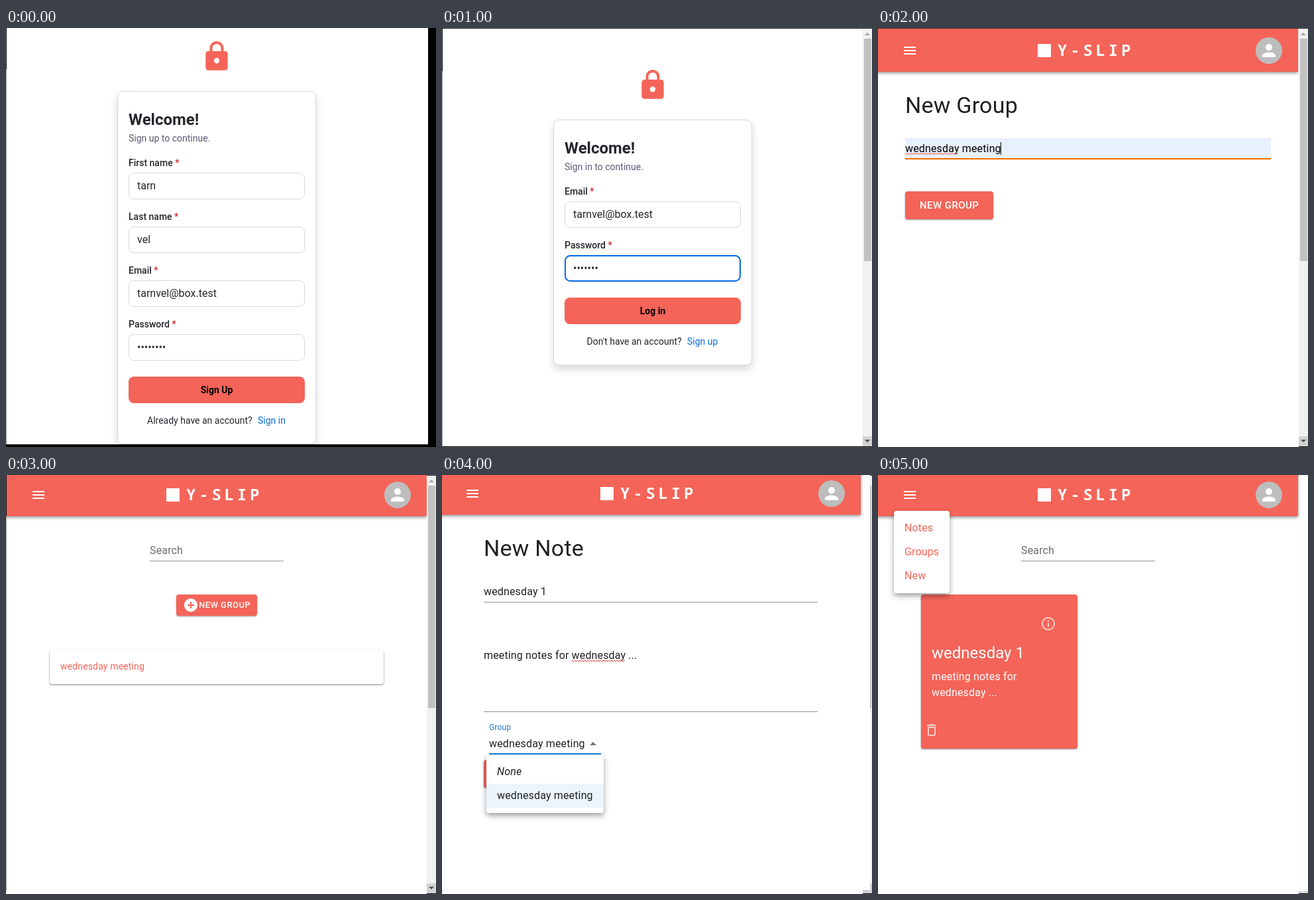
Recreate the animation shown at these times as an HTML page. Size 649 by 631 pixels, loop 6 s.

```html
<!DOCTYPE html>
<html lang="en">
<head>
<meta charset="utf-8">
<title>Notes app tour</title>
<style>
  html, body { margin: 0; width: 100%; height: 100%; overflow: hidden; background: #fff; }
  svg { display: block; font-family: Roboto, sans-serif; white-space: pre; }
  .brand { font: 700 24px "Noto Sans Mono", monospace; letter-spacing: 4.8px; }
  .app { letter-spacing: .15px; }
  .bar { filter: drop-shadow(0 2px 2.5px rgba(0,0,0,.42)); }
  .sheet { filter: drop-shadow(0 4px 4px rgba(0,0,0,.38)); }
  .raised { filter: drop-shadow(0 1.5px 1.2px rgba(0,0,0,.42)); }
  .flat { filter: drop-shadow(0 1px .9px rgba(0,0,0,.5)); }
  .form { filter: drop-shadow(0 6px 6px rgba(60,60,70,.2)); }
</style>
</head>
<body>
<svg id="stage" width="649" height="631" viewBox="0 0 649 631"></svg>
<script>
const CORAL = '#f46458', INK = '#25252d', DARK = '#212121', BLUE = '#096bde', GREY = '#949494';

const ICONS = {
  lock: 'M18 8h-1V6c0-2.76-2.24-5-5-5S7 3.24 7 6v2H6c-1.1 0-2 .9-2 2v10c0 1.1.9 2 2 2h12c1.1 0 2-.9 2-2V10c0-1.1-.9-2-2-2zm-6 9c-1.1 0-2-.9-2-2s.9-2 2-2 2 .9 2 2-.9 2-2 2zm3.1-9H8.9V6c0-1.71 1.39-3.1 3.1-3.1s3.1 1.39 3.1 3.1z',
  menu: 'M3 18h18v-2H3zm0-5h18v-2H3zm0-7v2h18V6z',
  person: 'M12 12c2.21 0 4-1.79 4-4s-1.79-4-4-4-4 1.79-4 4 1.79 4 4 4zm0 2c-2.67 0-8 1.34-8 4v2h16v-2c0-2.66-5.33-4-8-4z',
  add: 'M12 2C6.48 2 2 6.48 2 12s4.48 10 10 10 10-4.48 10-10S17.52 2 12 2zm5 11h-4v4h-2v-4H7v-2h4V7h2v4h4z',
  info: 'M11 7h2v2h-2zm0 4h2v6h-2zm1-9C6.48 2 2 6.48 2 12s4.48 10 10 10 10-4.48 10-10S17.52 2 12 2zm0 18c-4.41 0-8-3.59-8-8s3.59-8 8-8 8 3.59 8 8-3.59 8-8 8z',
  bin: 'M6 19c0 1.1.9 2 2 2h8c1.1 0 2-.9 2-2V7H6zM8 9h8v10H8zm7.5-5l-1-1h-5l-1 1H5v2h14V4z'
};

const rect = (x, y, w, h, fill, attrs = '') =>
  `<rect x="${x}" y="${y}" width="${w}" height="${h}" fill="${fill}" ${attrs}/>`;
const text = (x, y, size, fill, str, attrs = '') =>
  `<text x="${x}" y="${y}" font-size="${size}" fill="${fill}" ${attrs}>${str}</text>`;
const icon = (name, x, y, size, fill, attrs = '') =>
  `<path d="${ICONS[name]}" fill="${fill}" fill-rule="evenodd" transform="translate(${x} ${y}) scale(${size / 24})" ${attrs}/>`;
const appText = (x, y, str, fill = DARK, size = 16, attrs = '') =>
  text(x, y, size, fill, str, 'class="app" ' + attrs);
const heading = (x, y, str) => text(x, y, 34, DARK, str, 'letter-spacing=".25"');
const squiggle = (x, y, width) =>
  `<path d="M${x} ${y}${'l2 2l2-2'.repeat(width / 4)}" fill="none" stroke="#e8413c"/>`;

function field(top, value, focused) {
  const inset = focused ? 1 : .5;
  return rect(185 + inset, top + inset, 266 - 2 * inset, 40 - 2 * inset, '#fff',
      `rx="7.5" stroke="${focused ? BLUE : '#d8d8df'}" stroke-width="${2 * inset}"`) +
    text(198, top + 25, 16, INK, value);
}

function signForm({ top, subtitle, fields, button, question, questionX, link, linkX }) {
  const buttonTop = top + 106 + fields.length * 81;
  const rows = fields.map(([label, value, focused], i) => {
    const y = top + 123 + i * 81;
    return text(185, y - 10, 14, INK, `${label} <tspan fill="#d3232f">*</tspan>`, 'font-weight="500"') +
      field(y, value, focused);
  });
  return icon('lock', 293, top - 77, 50, CORAL) +
    rect(168.5, top + .5, 299, buttonTop + 101 - top, '#fff', 'rx="7.5" stroke="#d8d8df" class="form"') +
    text(185, top + 51, 24, INK, 'Welcome!', 'font-weight="700"') +
    text(185, top + 76, 14, '#5a5a72', subtitle) +
    rows.join('') +
    rect(185, buttonTop, 266, 40, CORAL, 'rx="8"') +
    text(318, buttonTop + 25, 14, '#000', button, 'font-weight="700" text-anchor="middle"') +
    text(questionX, buttonTop + 71, 14, INK, question) +
    text(linkX, buttonTop + 71, 14, BLUE, link);
}

const leftEdge = split => rect(0, 0, 1, split, '#111') + rect(0, split, 1, 627 - split, '#a4a4a4');

const scrollbar =
  rect(635, 0, 14, 631, '#f1f1f1') +
  rect(637, 16, 11, 335, '#c1c1c1') +
  rect(635, 615, 14, 15, '#d2d2d2') +
  rect(635, 0, 14, 1, '#222') + rect(635, 630, 14, 1, '#000') +
  '<path d="M638 11h8l-4-4z" fill="#a3a3a3"/><path d="M638 620h8l-4 4z" fill="#505050"/>';

// Positions are relative to a 66px tall bar, moved as a whole.
const header = (dx, dy) =>
  `<g transform="translate(${dx} ${dy})">` +
  rect(-5, -5, 639, 71, CORAL, 'class="bar"') +
  icon('menu', 36, 22, 24, '#fff') +
  rect(241, 24, 20, 20, '#fff') +
  '<text x="271" y="42" class="brand" fill="#fff">Y-SLIP</text>' +
  '<circle cx="590" cy="34" r="20" fill="#bdbdbd"/>' +
  icon('person', 575, 19, 30, '#fff') + '</g>';

const searchBox = x =>
  appText(x, 119, 'Search', '#6b6b6b') + rect(x, 129, 202, 1, GREY);

const signUp = signForm({
  top: 95, subtitle: 'Sign up to continue.', button: 'Sign Up',
  fields: [['First name', 'tarn'], ['Last name', 'vel'],
    ['Email', 'tarnvel@box.test'], ['Password', '•'.repeat(8)]],
  question: 'Already have an account?', questionX: 213, link: 'Sign in', linkX: 380
}) + leftEdge(62) + rect(637, 0, 12, 631, '#000') + rect(0, 627, 649, 4, '#000');

const logIn = signForm({
  top: 138, subtitle: 'Sign in to continue.', button: 'Log in',
  fields: [['Email', 'tarnvel@box.test'], ['Password', '•'.repeat(7), true]],
  question: "Don't have an account?", questionX: 218.5, link: 'Sign up', linkX: 370
}) + leftEdge(65) + rect(0, 627, 1, 3, '#a4a4a4') +
  rect(0, 0, 635, 1, '#222') + rect(0, 630, 635, 1, '#000') + scrollbar;

const newGroup = header(0, 0) + rect(0, 0, 635, 1, '#333') +
  heading(41, 128, 'New Group') +
  rect(41, 166, 552, 30, '#e8f0fe') + rect(41, 196, 552, 2, '#ef6c00') +
  appText(41, 187, 'wednesday meeting', '#000') + squiggle(41, 188.5, 81) +
  rect(185, 172, 1, 19, '#000') +
  rect(41, 246, 133, 42, CORAL, 'rx="4" class="raised"') +
  text(63, 272, 15, '#fff', 'NEW GROUP', 'font-weight="500" letter-spacing=".43"') + scrollbar;

const groupList = header(1, -4) + leftEdge(62) + searchBox(217) +
  rect(257, 180, 122, 32, CORAL, 'rx="4" class="raised"') +
  icon('add', 267, 184, 24, '#fff') +
  text(291, 200, 13, '#fff', 'NEW GROUP', 'font-weight="500" letter-spacing=".46"') +
  rect(66, 263, 504, 52, '#fff', 'rx="4" class="flat"') +
  appText(82, 293, 'wednesday meeting', CORAL, 14) + scrollbar;

const newNote = scrollbar + rect(0, 0, 646, 625, '#fff') + rect(0, 625, 1, 2, '#a4a4a4') +
  header(-2, -6) +
  heading(63, 122, 'New Note') +
  appText(63, 181, 'wednesday 1') + rect(63, 191, 504, 1, GREY) +
  appText(63, 277, 'meeting notes for wednesday ...') + squiggle(196, 279, 81) +
  rect(63, 356, 504, 1, GREY) +
  appText(71, 384, 'Group', '#1976d2', 12) +
  appText(71, 410, 'wednesday meeting') +
  '<path d="M223 407h10l-5-5z" fill="#757575"/>' +
  rect(63, 429, 100, 42, CORAL, 'rx="4" class="raised"') +
  rect(67, 421, 177, 88, '#fff', 'rx="4" class="sheet"') +
  rect(71, 419, 169, 2, '#1976d2') +
  rect(67, 465, 177, 36, '#ecf4fc') +
  appText(83, 452, 'None', DARK, 16, 'font-style="italic"') +
  appText(83, 488, 'wednesday meeting');

const noteList = scrollbar + rect(0, 0, 649, 627, '#fff') + header(0, -4) + searchBox(216) +
  rect(65, 180, 236, 232, CORAL, 'rx="4" class="flat"') +
  icon('info', 245, 212, 24, '#fff', 'opacity=".65"') +
  text(81, 276, 24, '#fff', 'wednesday 1') +
  appText(81, 309, 'meeting notes for', '#fff') +
  appText(81, 333, 'wednesday ...', '#fff') +
  icon('bin', 69, 372, 24, '#fff', 'opacity=".65"') +
  rect(24, 54, 84, 124, '#fff', 'rx="4" class="sheet"') +
  ['Notes', 'Groups', 'New'].map((item, i) => appText(40, 85 + 36 * i, item, CORAL)).join('');

const scenes = [signUp, logIn, newGroup, groupList, newNote, noteList];
const SCENE_MS = 1000;
const stage = document.getElementById('stage');
stage.innerHTML = scenes.map(scene => `<g display="none">${scene}</g>`).join('');

const start = performance.now();
let shown = -1;
function draw() {
  const current = Math.floor((performance.now() - start) / SCENE_MS) % scenes.length;
  if (current !== shown) {
    [...stage.children].forEach((group, i) => group.setAttribute('display', i === current ? 'inline' : 'none'));
    shown = current;
  }
  requestAnimationFrame(draw);
}
draw();
</script>
</body>
</html>
```
